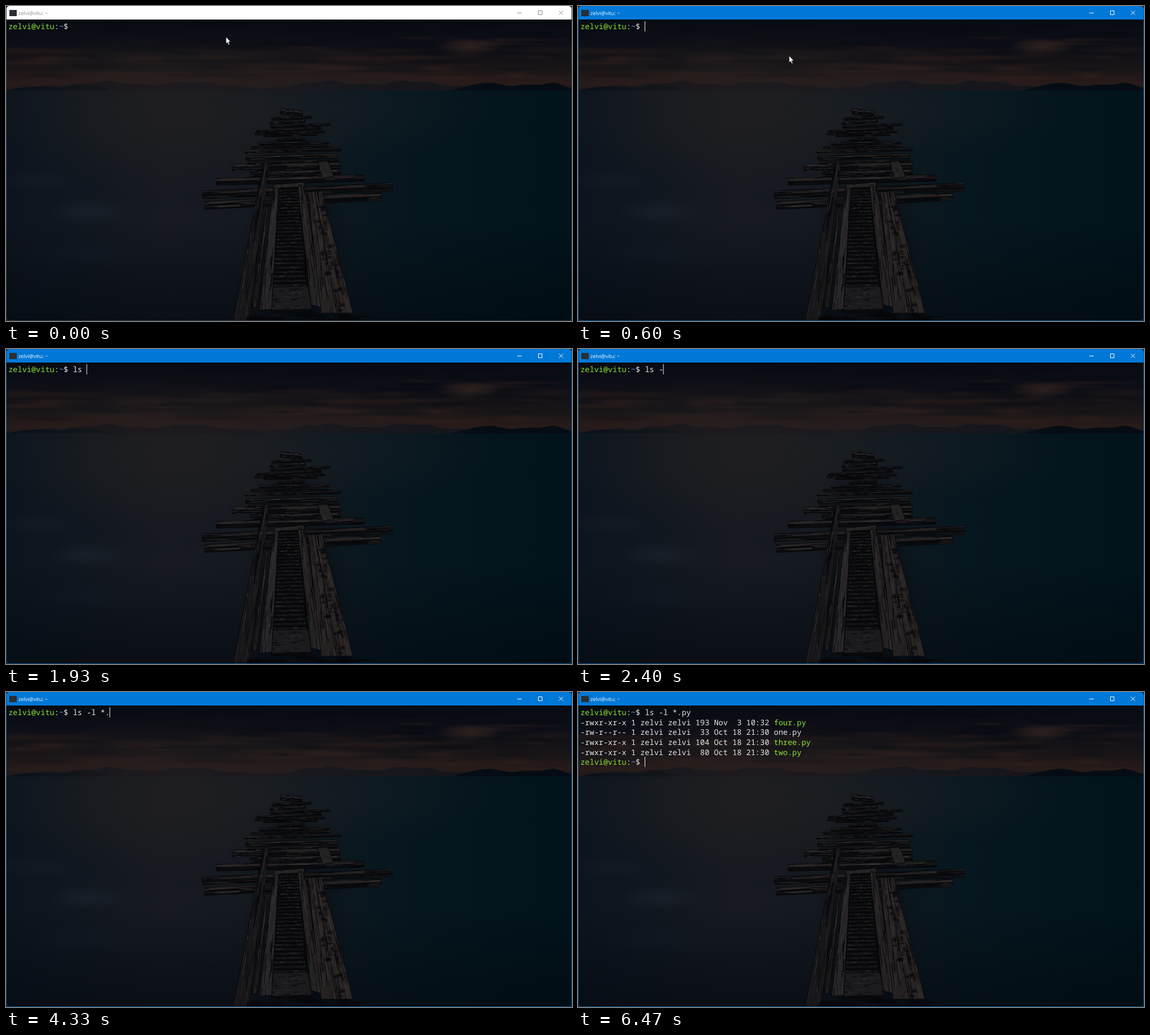
Write an HTML page with a canvas that moves like this. It is 1002x559 px and loops after 8000 ms.

```html
<!DOCTYPE html>
<html lang="en">
<head>
<meta charset="utf-8">
<title>Terminal</title>
<style>
@property --n { syntax: "<integer>"; inherits: true; initial-value: 0; }
html, body { margin: 0; width: 100%; height: 100%; overflow: hidden; background: #17242e; }
#win {
  --ch: 8.16px;
  position: absolute; left: 0; top: 0; width: 1002px; height: 559px;
  border-radius: 6px; overflow: hidden;
  animation: typing 8s step-end infinite;
}
#win > * { position: absolute; }
canvas { left: 0; top: 0; }
#bar {
  left: 0; top: 0; width: 1002px; height: 24px;
  animation: focus 8s step-end infinite;
}
#bar span {
  position: absolute; left: 22px; top: 0;
  font: 9.1px/25px "Open Sans", sans-serif; white-space: pre;
  text-rendering: geometricPrecision;
}
#bar svg { position: absolute; left: 0; top: 0; }
#frame {
  inset: 0; border: 1px solid; border-top: 0; border-radius: 6px;
  animation: edge 8s step-end infinite;
}
pre {
  margin: 0; left: 4.2px; top: 27.2px; color: #e6e6e6;
  font: 13.6px/17.6px "Noto Sans Mono", monospace;
  text-rendering: geometricPrecision; font-variant-ligatures: none;
}
pre i { font-style: normal; color: #8ae234; }
pre b { font-weight: 400; color: #729fcf; }
#cmd { left: 118.44px; width: calc(var(--n) * var(--ch)); overflow: hidden; }
#out { top: 44.8px; animation: show 8s step-end infinite; }
#caret {
  left: 118px; top: 27px; width: 1px; height: 18px; background: #f2f2f2;
  transform: translateX(calc(var(--n) * var(--ch)));
  animation: caret 8s step-end infinite;
}
#mouse { left: 0; top: 0; animation: mouse 8s step-end infinite; }
@keyframes typing {
  0% { --n: 0; }
  21.375% { --n: 1; }
  22.75% { --n: 2; }
  24.125% { --n: 3; }
  30% { --n: 4; }
  33.375% { --n: 5; }
  35% { --n: 6; }
  47.5% { --n: 7; }
  54.125% { --n: 8; }
  60% { --n: 9; }
  65%, 100% { --n: 10; }
}
@keyframes focus {
  0% { background: #fff; color: #8c8c8c; }
  7.5%, 100% { background: #0078d7; color: #fff; }
}
@keyframes edge {
  0% { border-color: #34424c; }
  7.5%, 100% { border-color: #07589b; }
}
@keyframes caret {
  0% { opacity: 0; }
  7.5% { opacity: 1; }
  80.875%, 100% { opacity: 1; transform: translateY(88px); }
}
@keyframes show {
  0% { visibility: hidden; }
  80.875%, 100% { visibility: visible; }
}
@keyframes mouse {
  0% { transform: translate(389px, 54.5px); }
  .875% { transform: translate(384px, 66px); }
  1.6875% { transform: translate(379px, 77px); }
  2.5% { transform: translate(373.3px, 88px); visibility: visible; }
  20%, 100% { transform: translate(373.3px, 88px); visibility: hidden; }
}
</style>
</head>
<body>
<div id="win">
  <canvas width="1002" height="559"></canvas>
  <div id="bar">
    <svg width="1002" height="24" fill="none" stroke="currentColor">
      <rect x="6" y="7" width="13" height="11" fill="#2b2f33" stroke="none"/>
      <path d="M905 12.5h8M942.5 8.5h6.5v7h-6.5zM979 8.5l7 7m0-7l-7 7"/>
    </svg>
    <span>zelvi@vitu: ~</span>
  </div>
  <div id="frame"></div>
  <pre><i>zelvi@vitu</i>:<b>~</b>$</pre>
  <pre id="cmd">ls -l *.py</pre>
  <pre id="out">-rwxr-xr-x 1 zelvi zelvi 193 Nov  3 10:32 <i>four.py</i>
-rw-r--r-- 1 zelvi zelvi  33 Oct 18 21:30 one.py
-rwxr-xr-x 1 zelvi zelvi 104 Oct 18 21:30 <i>three.py</i>
-rwxr-xr-x 1 zelvi zelvi  80 Oct 18 21:30 <i>two.py</i>
<i>zelvi@vitu</i>:<b>~</b>$</pre>
  <div id="caret"></div>
  <svg id="mouse" width="12" height="17">
    <path d="M.5 .5v11.8l2.6-2.4 2 4.4 1.9-.8-2-4.4h3.6z" fill="#fff" stroke="#111" stroke-width=".6"/>
  </svg>
</div>
<script>
const W = 1002, H = 559, SKY = 24, SEA = 150;
const c = document.querySelector("canvas").getContext("2d");

let seed = 11;
const rnd = (a = 0, b = 1) => {
  seed = (seed * 16807) % 2147483647;
  return a + (b - a) * seed / 2147483647;
};
const mix = (a, b, t) => a + (b - a) * t;

function fade(x0, y0, x1, y1, stops) {
  const g = c.createLinearGradient(x0, y0, x1, y1);
  for (const [at, color] of stops) g.addColorStop(at, color);
  return g;
}

// Soft elliptical blot
function blot(x, y, rx, ry, rgb, alpha) {
  const g = c.createRadialGradient(0, 0, 0, 0, 0, 1);
  g.addColorStop(0, `rgba(${rgb},${alpha})`);
  g.addColorStop(.5, `rgba(${rgb},${alpha * .55})`);
  g.addColorStop(1, `rgba(${rgb},0)`);
  c.save();
  c.translate(x, y);
  c.scale(rx, ry);
  c.fillStyle = g;
  c.fillRect(-1, -1, 2, 2);
  c.restore();
}

function sky() {
  c.fillStyle = fade(0, SKY, 0, SEA, [
    [0, "#080b13"], [.35, "#0e0f16"], [.7, "#191517"], [.9, "#281b1a"], [1, "#1f181b"]
  ]);
  c.fillRect(0, SKY, W, SEA - SKY);
  for (let i = 0; i < 150; i++) {
    const y = rnd(20, 128), warm = rnd() < (y - 35) / 130;
    blot(rnd(0, W), y, rnd(30, 120), rnd(3, 9), warm ? "54,35,29" : "7,9,16", rnd(.2, .5));
  }
  blot(822, 72, 60, 14, "66,46,37", .6);
  blot(300, 128, 260, 14, "48,29,25", .4);
  blot(640, 126, 300, 14, "52,30,26", .4);
}

function hills(x0, x1, height, color, k) {
  c.fillStyle = color;
  c.beginPath();
  c.moveTo(x0, SEA);
  for (let x = x0; x <= x1; x += 4) {
    const t = (x - x0) / (x1 - x0);
    const bumps = .75 + .17 * Math.sin(x / 23 + k) + .08 * Math.sin(x / 9);
    c.lineTo(x, SEA - height * bumps * Math.min(1, 4 * t, 4 * (1 - t) + .35));
  }
  c.lineTo(x1, SEA);
  c.fill();
}

function sea() {
  c.fillStyle = fade(0, 0, W, 0, [
    [0, "#0c151d"], [.28, "#15191f"], [.5, "#11181e"], [.68, "#07171f"], [1, "#01131b"]
  ]);
  c.fillRect(0, SEA, W, H - SEA);
  blot(310, 185, 330, 150, "37,34,34", .65);
  blot(610, 180, 260, 90, "25,31,36", .45);
  blot(330, 370, 230, 130, "28,28,36", .35);
  blot(145, 365, 75, 22, "36,43,52", .4);
  blot(60, 310, 80, 20, "26,33,42", .3);
  blot(150, 440, 130, 26, "25,34,43", .3);
  c.fillStyle = fade(0, 380, 0, H, [[0, "rgba(1,6,12,0)"], [1, "rgba(1,6,12,.5)"]]);
  c.fillRect(0, 380, W, H - 380);
}

// Board from edge a-b to edge d-e, with n streaks of grain along it
function board(ax, ay, bx, by, dx, dy, ex, ey, color, n) {
  c.save();
  c.beginPath();
  c.moveTo(ax, ay);
  c.lineTo(bx, by);
  c.lineTo(ex, ey);
  c.lineTo(dx, dy);
  c.closePath();
  c.fillStyle = color;
  c.fill();
  c.strokeStyle = "#060709";
  c.stroke();
  c.clip();
  for (let i = 0; i < n; i++) {
    const u = rnd(), s = rnd(-.1, 1), e = s + rnd(.03, .2);
    const x0 = mix(ax, bx, u), y0 = mix(ay, by, u);
    const x1 = mix(dx, ex, u), y1 = mix(dy, ey, u);
    c.strokeStyle = rnd() < .6 ? "rgba(5,6,8,.65)" : "rgba(58,54,53,.5)";
    c.lineWidth = rnd(.6, 2);
    c.beginPath();
    c.moveTo(mix(x0, x1, s), mix(y0, y1, s));
    c.lineTo(mix(x0, x1, e), mix(y0, y1, e));
    c.stroke();
  }
  c.restore();
}

// Cross plank with a lit top and a dark front
function plank(x0, y0, x1, y1, h) {
  const top = h * .45;
  board(x0, y0 + top, x0 + 1, y0 + h, x1, y1 + top, x1, y1 + h, "#0b0c0f", h * 2);
  board(x0 + 1, y0, x0, y0 + top, x1 - 1, y1, x1, y1 + top, "#242122", h * 2);
}

function jetty() {
  blot(505, 250, 70, 26, "4,6,9", .5);
  blot(515, 440, 100, 190, "3,5,8", .6);
  for (const p of [
    [485, 182, 524, 186, 10], [470, 198, 541, 195, 5], [467, 206, 530, 202, 5],
    [468, 213, 574, 208, 4], [443, 221, 558, 214, 5], [440, 225, 564, 221, 4],
    [455, 229, 552, 227, 3], [480, 235, 530, 234, 5], [448, 242, 572, 240, 5],
    [434, 249, 576, 246, 4], [422, 256, 592, 252, 5], [424, 266, 587, 262, 8],
    [428, 276, 588, 272, 5], [400, 281, 592, 277, 12], [432, 294, 592, 290, 10],
    [372, 306, 634, 299, 12], [347, 328, 684, 314, 14], [351, 347, 664, 331, 14]
  ]) plank(...p);

  // Deck well and rungs
  board(482, 322, 518, 322, 468, 545, 540, 545, "#08090b", 0);
  for (let y = 326; y < 498; y += 5 + (y - 326) / 50) {
    const t = (y - 322) / 223, l = mix(483, 471, t), r = mix(517, 536, t);
    board(l, y, l, y + 3 + t * 2, r, y - 1, r, y + 2 + t * 2, "#151517", 9);
  }
  board(473, 499, 470, 540, 535, 497, 541, 538, "#1b1a1c", 40);

  board(552, 276, 570, 275, 560, 305, 580, 303, "#232122", 16);
  board(456, 276, 466, 275, 402, 559, 430, 559, "#171618", 60);
  board(460, 357, 464, 357, 435, 535, 445, 535, "#1b1818", 20);
  board(474, 317, 483, 316, 449, 540, 470, 538, "#262427", 45);
  board(516, 315, 528, 314, 540, 530, 560, 535, "#242122", 50);
  board(474, 317, 474, 324, 527, 313, 528, 320, "#262324", 14);
  board(535, 330, 547, 329, 558, 545, 586, 545, "#252121", 70);
  board(547, 329, 559, 328, 586, 545, 614, 545, "#292424", 70);
  for (let i = 0; i < 30; i++) {
    const t = rnd();
    blot(mix(548, 588, t) + rnd(-9, 14), mix(335, 540, t), rnd(2, 8), rnd(2, 6), "5,6,8", .9);
  }
  for (let i = 0; i < 18; i++) blot(rnd(410, 630), rnd(546, 560), rnd(10, 28), rnd(3, 8), "4,5,7", .8);
}

sky();
hills(0, 450, 17, "#14131a", 0);
hills(430, 830, 18, "#15141a", 2);
hills(0, 180, 10, "#0b0f17", 1);
hills(785, W, 15, "#060c14", 3);
sea();
jetty();
</script>
</body>
</html>
```
